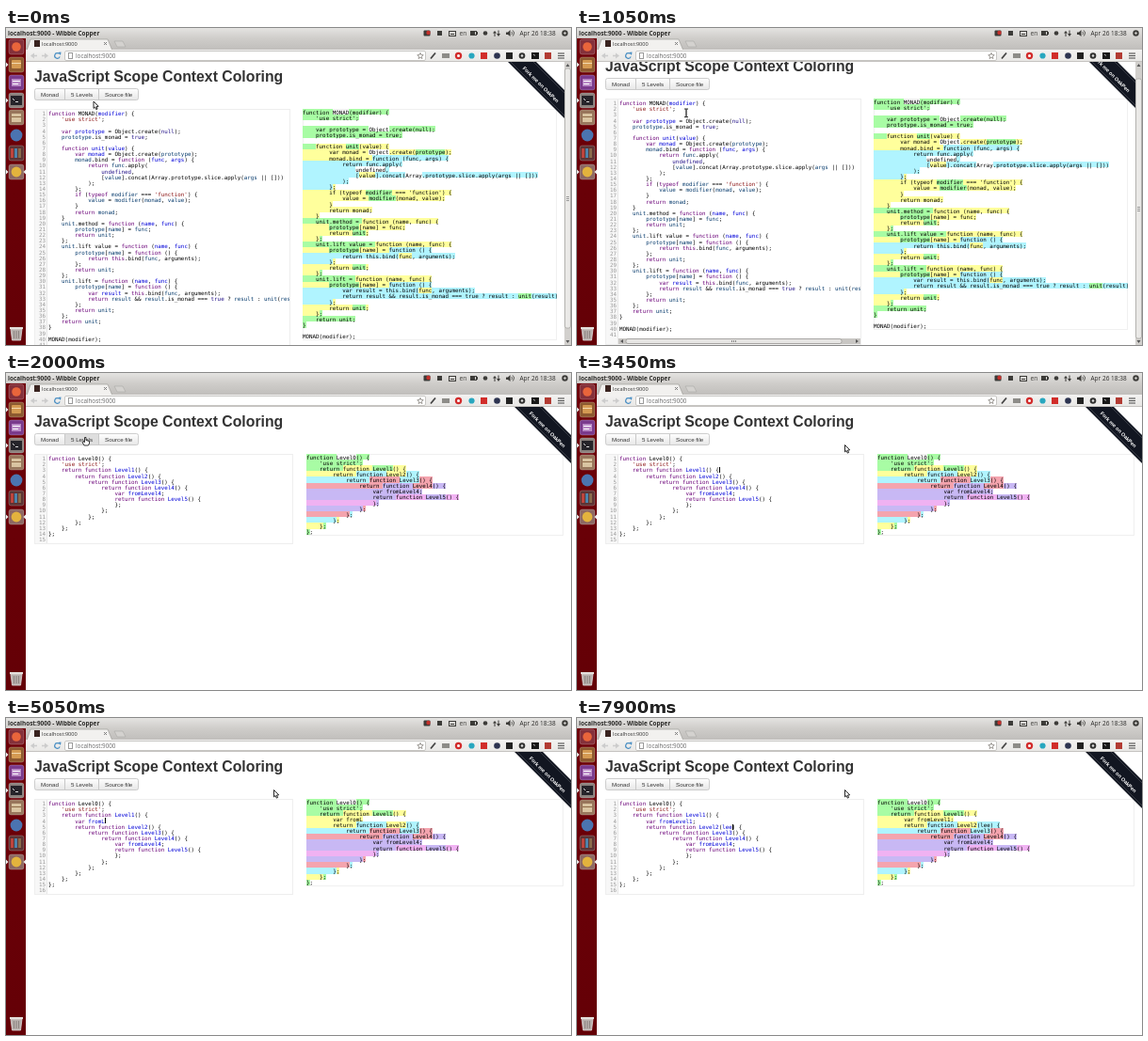
An HTML page with a canvas for the animation above (8 s loop, 600 px wide and 337 px high).

```html
<!DOCTYPE html>
<html lang="en">
<head>
<meta charset="utf-8">
<title>Scope coloring demo</title>
<style>
  html, body { margin: 0; width: 100%; height: 100%; overflow: hidden; background: #fff; }
  canvas { display: block; width: 600px; height: 337px; }
</style>
</head>
<body>
<canvas id="stage" width="600" height="337"></canvas>
<script>
const ctx = document.getElementById('stage').getContext('2d');
const LOOP = 8000;
const SANS = '"Liberation Sans", Arial, sans-serif';
const UI = '"Open Sans", "Noto Sans", sans-serif';
const CODE = '5.85px "DejaVu Sans Mono", monospace';
const CHAR = 3.522;
const LEVELS = ['#a8fca4', '#ffff9c', '#b0f4ff', '#f4a4ae', '#c8b8f4', '#f0b2f2'];

const MONAD = `function MONAD(modifier) {
    'use strict';

    var prototype = Object.create(null);
    prototype.is_monad = true;

    function unit(value) {
        var monad = Object.create(prototype);
        monad.bind = function (func, args) {
            return func.apply(
                undefined,
                [value].concat(Array.prototype.slice.apply(args || []))
            );
        };
        if (typeof modifier === 'function') {
            value = modifier(monad, value);
        }
        return monad;
    }
    unit.method = function (name, func) {
        prototype[name] = func;
        return unit;
    };
    unit.lift\u00a0value = function (name, func) {
        prototype[name] = function () {
            return this.bind(func, arguments);
        };
        return unit;
    };
    unit.lift = function (name, func) {
        prototype[name] = function () {
            var result = this.bind(func, arguments);
            return result && result.is_monad === true ? result : unit(result);
        };
        return unit;
    };
    return unit;
}

MONAD(modifier);
`;

function nested(extra, arg) {
  const pad = n => ' '.repeat(4 * n);
  const lines = ['function Level0() {', pad(1) + "'use strict';"];
  for (let i = 1; i <= 5; i++) {
    if (i === 5) lines.push(pad(5) + 'var fromLevel4;');
    lines.push(`${pad(i)}return function Level${i}(${i === 2 ? arg : ''}) {`);
    if (i === 1 && extra !== null) lines.push(extra);
  }
  for (let i = 5; i >= 0; i--) lines.push(pad(i) + '};');
  return lines.join('\n') + '\n';
}

// Splits code into tokens and finds the scope that owns each name.
function parse(src) {
  const tokens = [];
  let scope = { level: -1, vars: new Set() };
  let depth = 0, row = 0, col = 0, prev = '';
  for (const text of src.match(/'[^'\n]*'|[\w\u00a0]+| +|\n|./g)) {
    if (text === '\n') { row++; col = 0; continue; }
    const token = { text, row, col };
    col += text.length;
    if (text === 'function') {
      scope = { up: scope, level: scope.level + 1, vars: new Set(), head: true };
    }
    token.scope = scope;
    const keyword = /^(function|var|return|if|typeof|this)$/.test(text);
    const atom = /^(true|null|undefined)$/.test(text);
    if (/^\w/.test(text) && !keyword && !/^(true|null)$/.test(text)) {
      token.name = prev !== '.';
      if (prev === 'function') token.scope = scope.up;
      if (prev === 'function' || prev === 'var' || scope.head) {
        token.scope.vars.add(text);
        token.def = token.scope.level >= 0;
      }
    }
    token.ink = keyword ? '#6a0078' : atom ? '#221188' : text[0] === "'" ? '#8a1212' : '#000';
    if (text === '{') {
      if (scope.head) { scope.head = false; scope.base = depth; }
      depth++;
    }
    if (text === '}' && --depth === scope.base) scope = scope.up;
    if (text.trim()) prev = text;
    tokens.push(token);
  }
  for (const t of tokens) {
    t.level = t.scope.level;
    if (!t.name || t.text === 'arguments') continue;
    let owner = t.scope;
    while (owner && !owner.vars.has(t.text)) owner = owner.up;
    t.level = owner ? owner.level : -1;
    if (t.def) t.ink = '#0000d8';
    else if (t.level >= 0) t.ink = '#063a6c';
  }
  return { tokens, rows: row + 1 };
}

const parsed = new Map();
function getCode(src) {
  if (!parsed.has(src)) parsed.set(src, parse(src));
  return parsed.get(src);
}

// Timeline
const WORD = 'var fromLevel1;';
const KEYS = [4300, 4350, 4450, 4500, 4600, 4650, 4750, 4900, 5050, 5100, 5200, 5300, 5400, 5650, 5900];
const MOUSE = [
  [0, 93, 78], [50, 93, 78], [250, 190, 180], [420, 290, 268], [620, 180, 160],
  [850, 116, 90], [1350, 116, 91], [1750, 85, 69], [2000, 84.5, 68.5], [2150, 84.5, 68.5],
  [2450, 106, 99], [2520, 106, 99], [2720, 295, 86], [2850, 284.5, 76.5], [LOOP, 284.5, 76.5]
];
const SCROLL = [[0, 0], [900, 4], [1000, 8], [1050, 11], [1350, 0]];
const CARET = [
  [0, null], [2500, 1, 17], [3100, null], [3300, 2, 17], [3450, 2, 30], [3600, 3, 6],
  [3900, 3, 7], [4000, 3, 8], ...KEYS.map((k, i) => [k, 3, 9 + i]), [6150, null],
  ...[...Array(9)].map((_, i) => [i ? 6500 + i * 100 : 6350, 4, 23 + i]),
  [7550, null], [7700, 4, 33], [7900, 4, 34]
];
const latest = (list, t) => list.filter(k => k[0] <= t).pop();

function mouseAt(t) {
  const i = Math.max(1, MOUSE.findIndex(k => k[0] > t));
  const [t0, x0, y0] = MOUSE[i - 1], [t1, x1, y1] = MOUSE[i];
  const u = (t - t0) / (t1 - t0), e = u * u * (3 - 2 * u);
  return [x0 + (x1 - x0) * e, y0 + (y1 - y0) * e];
}

function sourceAt(t) {
  if (t < 1800) return MONAD;
  if (t < 3600) return nested(null, '');
  const spaces = t < 3900 ? 6 : t < 4000 ? 7 : 8;
  const count = KEYS.filter(k => k <= t).length;
  return nested(' '.repeat(spaces) + WORD.slice(0, count), t < 7700 ? '' : t < 7900 ? 'le' : 'lee');
}

// Drawing helpers
function rect(x, y, w, h, fill) { ctx.fillStyle = fill; ctx.fillRect(x, y, w, h); }
function frame(x, y, w, h, color) {
  ctx.strokeStyle = color;
  ctx.lineWidth = 1;
  ctx.strokeRect(x + .5, y + .5, w - 1, h - 1);
}
function round(x, y, w, h, r, fill, stroke) {
  ctx.beginPath();
  ctx.roundRect(x, y, w, h, r);
  if (fill) { ctx.fillStyle = fill; ctx.fill(); }
  if (stroke) { ctx.strokeStyle = stroke; ctx.lineWidth = .8; ctx.stroke(); }
}
function dot(x, y, r, fill) {
  ctx.beginPath();
  ctx.arc(x, y, r, 0, 7);
  ctx.fillStyle = fill;
  ctx.fill();
}
function poly(points, fill, stroke, width = 1) {
  ctx.beginPath();
  points.forEach(([x, y]) => ctx.lineTo(x, y));
  ctx.closePath();
  if (fill) { ctx.fillStyle = fill; ctx.fill(); }
  if (stroke) { ctx.strokeStyle = stroke; ctx.lineWidth = width; ctx.stroke(); }
}
function line(x0, y0, x1, y1, color, width = 1) {
  ctx.beginPath();
  ctx.moveTo(x0, y0);
  ctx.lineTo(x1, y1);
  ctx.strokeStyle = color;
  ctx.lineWidth = width;
  ctx.stroke();
}
function text(str, x, y, font, color, align = 'left') {
  ctx.font = font;
  ctx.fillStyle = color;
  ctx.textAlign = align;
  ctx.fillText(str, x, y);
}
function shade(y0, y1, a, b) {
  const g = ctx.createLinearGradient(0, y0, 0, y1);
  g.addColorStop(0, a);
  g.addColorStop(1, b);
  return g;
}
function clip(x, y, w, h, draw) {
  ctx.save();
  ctx.beginPath();
  ctx.rect(x, y, w, h);
  ctx.clip();
  draw();
  ctx.restore();
}

function drawPanel() {
  rect(0, 0, 600, 11, shade(0, 11, '#e4e3e1', '#cfcdca'));
  text('localhost:9000 - Wibble Copper', 2, 7.8, `bold 6.4px ${UI}`, '#2b2a28');
  const ink = '#3c3b38';
  round(443.5, 2.5, 7, 6, 1, ink);
  dot(448.5, 5, 2.2, '#c4302b');
  rect(458, 3, 5, 5, ink);
  frame(470, 3, 8, 6, ink);
  line(472, 6.5, 476, 6.5, ink);
  text('en', 481.5, 8, `6.6px ${UI}`, ink);
  frame(493, 3, 7, 5, ink);
  rect(494, 4, 4, 3, ink);
  rect(500, 4, 1, 3, ink);
  dot(509, 5.5, 2.3, ink);
  poly([[519, 3], [521, 5.5], [517, 5.5]], ink);
  line(519, 4, 519, 9, ink);
  poly([[523, 9], [525, 6], [521, 6]], ink);
  line(523, 2.5, 523, 7, ink);
  poly([[531, 4.5], [533, 4.5], [535.5, 2], [535.5, 9], [533, 7], [531, 7]], ink);
  for (const r of [2, 4]) {
    ctx.beginPath();
    ctx.arc(535.5, 5.5, r, -.9, .9);
    ctx.strokeStyle = ink;
    ctx.lineWidth = .8;
    ctx.stroke();
  }
  text('Apr 26 18:38', 545.5, 8, `6.5px ${UI}`, '#2b2a28');
  dot(593.5, 5.5, 3.2, ink);
  dot(593.5, 5.5, 1.2, '#d8d6d3');
}

function drawBrowser() {
  rect(21, 11, 579, 13, shade(11, 24, '#cfcdca', '#bfbdba'));
  poly([[22, 24], [26, 12], [108, 12], [113, 24]], '#f2f1ef', '#a09e9a', .7);
  rect(30, 13, 6, 7, '#3a2420');
  text('localhost:9000', 38, 18.8, `5.6px ${UI}`, '#333');
  line(104, 15, 107, 18, '#777', .9);
  line(107, 15, 104, 18, '#777', .9);
  poly([[115, 14], [124, 14], [127, 20], [118, 20]], '#d4d2cf', '#aaa8a4', .6);
  rect(21, 23, 579, 13, shade(23, 36, '#f3f2f1', '#e8e7e5'));
  rect(21, 35, 579, 1, '#c4c2bf');
  line(27, 29.5, 33, 29.5, '#ccc', 1.6);
  poly([[26, 29.5], [30, 26.5], [30, 32.5]], '#ccc');
  line(38, 29.5, 43, 29.5, '#ccc', 1.6);
  poly([[45, 29.5], [41, 26.5], [41, 32.5]], '#ccc');
  ctx.beginPath();
  ctx.arc(54.5, 29.5, 2.8, .3, 5.3);
  ctx.strokeStyle = '#4a8fc4';
  ctx.lineWidth = 1.2;
  ctx.stroke();
  poly([[55, 26], [58.5, 25.5], [58, 29]], '#4a8fc4');
  round(62.5, 24.5, 383, 10, 1.5, '#fff', '#bdbbb8');
  frame(66, 26, 5, 7, '#999');
  text('localhost:9000', 74, 31.8, `6.3px ${UI}`, '#666');
  poly([...Array(10)].map((_, i) => {
    const a = i * Math.PI / 5 - Math.PI / 2, r = i % 2 ? 1.5 : 3.4;
    return [440 + r * Math.cos(a), 29.8 + r * Math.sin(a)];
  }), '#fff', '#77736c', .7);
  line(451, 32.5, 456, 26.5, '#444', 1.8);
  rect(463, 27, 8, 5, '#8d8c88');
  dot(480.5, 29.5, 3.7, '#d22b2b');
  dot(480.5, 29.5, 1.5, '#fff');
  dot(494.5, 29.5, 3.1, '#28a7bf');
  rect(504, 26, 7, 7, '#d12d2a');
  dot(521.5, 29.5, 3.3, '#2c3350');
  rect(531, 26, 7, 7, '#222');
  dot(548, 29.5, 3.3, '#30302f');
  dot(548, 29.5, 1.3, '#ddd');
  rect(558, 26, 8, 7, '#191919');
  line(560, 28, 562, 29.5, '#ddd', .8);
  rect(572, 26, 7, 7, '#b23b33');
  for (const y of [27, 29.5, 32]) line(586, y, 593, y, '#555', 1.1);
}

function drawLauncher() {
  rect(0, 11, 21, 326, shade(11, 337, '#6e0008', '#640006'));
  const tile = (y, fill) => round(3, y - 8, 16, 16, 2.5, fill, 'rgba(255,255,255,.28)');
  tile(20, '#84303a');
  dot(11, 20, 4.8, '#e9653b');
  tile(39, '#8d5a30');
  round(6, 34, 10, 9, 1, '#d49a52');
  rect(6, 37, 10, 1, '#f3dab0');
  tile(58, '#7a3a8c');
  rect(6, 54, 10, 8, '#b98ac6');
  line(7, 56.5, 15, 56.5, '#fff', 1);
  line(7, 59.5, 13, 59.5, '#fff', 1);
  tile(77, '#8a817d');
  rect(5, 72, 12, 10, '#26242a');
  line(7, 75, 9, 77, '#eee', .9);
  line(10, 78.5, 13, 78.5, '#eee', .9);
  tile(95, '#98765c');
  rect(6, 91, 10, 9, '#d8c4a1');
  rect(6, 94, 10, 1, '#8d6845');
  dot(11, 114, 6.4, '#4b74b0');
  tile(133, '#5d3434');
  ['#be443c', '#4d83aa', '#8a6a4a'].forEach((c, i) => rect(5 + i * 4, 128, 3, 10, c));
  tile(153, '#8d6863');
  dot(11, 153, 5.4, '#e3b33d');
  for (const y of [39, 77, 153]) poly([[0, y - 2.5], [2.5, y], [0, y + 2.5]], '#eee');
  poly([[21, 150.5], [18.5, 153], [21, 155.5]], '#eee');
  poly([[5, 320], [17, 320], [15.5, 332], [6.5, 332]], '#b8b0ad', '#e0dad8', .8);
  rect(4, 318, 14, 2, '#e4dfdc');
  for (const x of [8.5, 11, 13.5]) line(x, 322, x, 330, '#79716e', .7);
}

function drawButtons(hover) {
  round(30.5, 64.5, 110, 12, 2, shade(64, 77, '#ffffff', '#e6e6e6'), '#c2c2c2');
  if (hover) rect(63, 65, 35, 11, '#dedede');
  line(62.5, 65, 62.5, 76, '#c8c8c8');
  line(98.5, 65, 98.5, 76, '#c8c8c8');
  const font = `6.2px ${SANS}`;
  text('Monad', 37, 73, font, '#333');
  text('5 Levels', 69, 73, font, '#333');
  text('Source file', 105, 73, font, '#333');
}

function drawEditor(code, right, bar, caret) {
  const lh = 6.145, top = 88;
  const h = Math.round(code.rows * lh + 4) + (bar ? 6 : 0);
  rect(30, 86, 14, h, '#f7f7f7');
  rect(43, 86, 1, h, '#e6e6e6');
  frame(30, 86, right - 30, h, '#eeeeee');
  clip(30, 86, right - 31, h, () => {
    for (let i = 0; i < code.rows; i++) {
      text(i + 1, 42, top + i * lh + 5.1, CODE, '#999', 'right');
    }
    for (const t of code.tokens) {
      text(t.text, 45 + t.col * CHAR, top + t.row * lh + 5.1, CODE, t.ink);
    }
    if (caret[1] !== null) {
      rect(Math.round(45 + caret[2] * CHAR), Math.round(top + caret[1] * lh), 1, 6, '#000');
    }
  });
  if (bar) {
    const y = 86 + h - 7;
    rect(44, y, right - 45, 6, '#c8c6c3');
    round(52, y + .5, 229, 5, 2, '#e6e5e3', '#9c9a97');
    for (const x of [164, 166, 168]) rect(x, y + 2, 1, 2, '#888');
    poly([[46, y + 3], [49, y + 1], [49, y + 5]], '#555');
    poly([[right - 3, y + 3], [right - 6, y + 1], [right - 6, y + 5]], '#555');
  }
}

function drawScopes(code, left, right) {
  const lh = 6.12, top = 86;
  frame(left, 86, right - left, Math.round((code.rows - 1) * lh + 1.5), '#f0f0f0');
  clip(left, 86, right - left, 300, () => {
    const x = col => Math.round(left + col * CHAR);
    for (const t of code.tokens) {
      if (t.level < 0) continue;
      const y = Math.round(top + t.row * lh), x0 = x(t.col);
      const y1 = Math.round(top + (t.row + 1) * lh);
      rect(x0, y, x(t.col + t.text.length) - x0, y1 - y, LEVELS[t.level]);
    }
    for (const t of code.tokens) {
      text(t.text, left + t.col * CHAR, top + t.row * lh + 5.6, CODE, '#000');
    }
  });
}

function drawRibbon(r) {
  poly([[r - 60, 36], [r - 30, 36], [r, 66], [r, 96]], '#121621');
  line(r - 57, 36, r, 93, 'rgba(255,255,255,.25)', .6);
  line(r - 33, 36, r, 69, 'rgba(255,255,255,.25)', .6);
  ctx.save();
  ctx.translate(r - 25, 60);
  ctx.rotate(Math.PI / 4);
  text('Fork me on OakPen', 0, 2, `bold 5.5px ${SANS}`, '#fff', 'center');
  ctx.restore();
}

function drawScrollbar(offset) {
  rect(593, 36, 7, 301, '#d2d0cd');
  round(593.5, 43 + offset, 6, 276, 2, '#eae9e7', '#a9a7a4');
  for (const d of [-2, 0, 2]) rect(595, 181 + d + offset, 3, 1, '#999');
  poly([[596.5, 38], [598.5, 41], [594.5, 41]], '#555');
  poly([[596.5, 335], [598.5, 332], [594.5, 332]], '#555');
}

function drawMouse([x, y], kind) {
  ctx.save();
  ctx.translate(x, y);
  if (kind === 'beam') {
    line(0, -4, 0, 4, '#222', 1.3);
    line(-2, -4.3, 2, -4.3, '#222', 1);
    line(-2, 4.3, 2, 4.3, '#222', 1);
  } else if (kind === 'hand') {
    poly([[-1, 0], [.5, 0], [.5, 3], [4, 4], [4, 6.5], [2.8, 8.5], [-1.5, 8.5], [-3.5, 5], [-2.5, 4.2], [-1, 5.2]],
      '#fff', '#222', .9);
  } else {
    poly([[0, 0], [0, 7.4], [1.7, 6], [2.8, 8.6], [4.1, 8], [3, 5.5], [5.2, 5.3]], '#fff', '#111', .9);
  }
  ctx.restore();
}

function render(t) {
  const monad = t < 1800;
  const code = getCode(sourceAt(t));
  const offset = latest(SCROLL, t)[1];
  const edge = monad ? 593 : 600;
  const mouse = mouseAt(t), [mx, my] = mouse;
  const hover = mx > 63 && mx < 98 && my > 64 && my < 77;
  const overCode = my > 86 && mx > 44 && mx < 301;

  rect(0, 0, 600, 337, '#fff');
  clip(21, 36, 579, 301, () => {
    ctx.translate(0, -offset);
    text('JavaScript Scope Context Coloring', 30, 57, `bold 15.8px ${SANS}`, '#333');
    drawButtons(hover);
    drawEditor(code, monad ? 302 : 305, monad, latest(CARET, t));
    drawScopes(code, monad ? 315 : 319, monad ? 585 : 592);
    drawRibbon(edge);
    ctx.translate(0, offset);
    if (monad) drawScrollbar(offset);
  });
  drawPanel();
  drawBrowser();
  drawLauncher();
  drawMouse(mouse, hover ? 'hand' : overCode ? 'beam' : 'arrow');
}

const start = performance.now();
function tick() {
  render((performance.now() - start) % LOOP);
  requestAnimationFrame(tick);
}
tick();
</script>
</body>
</html>
```
